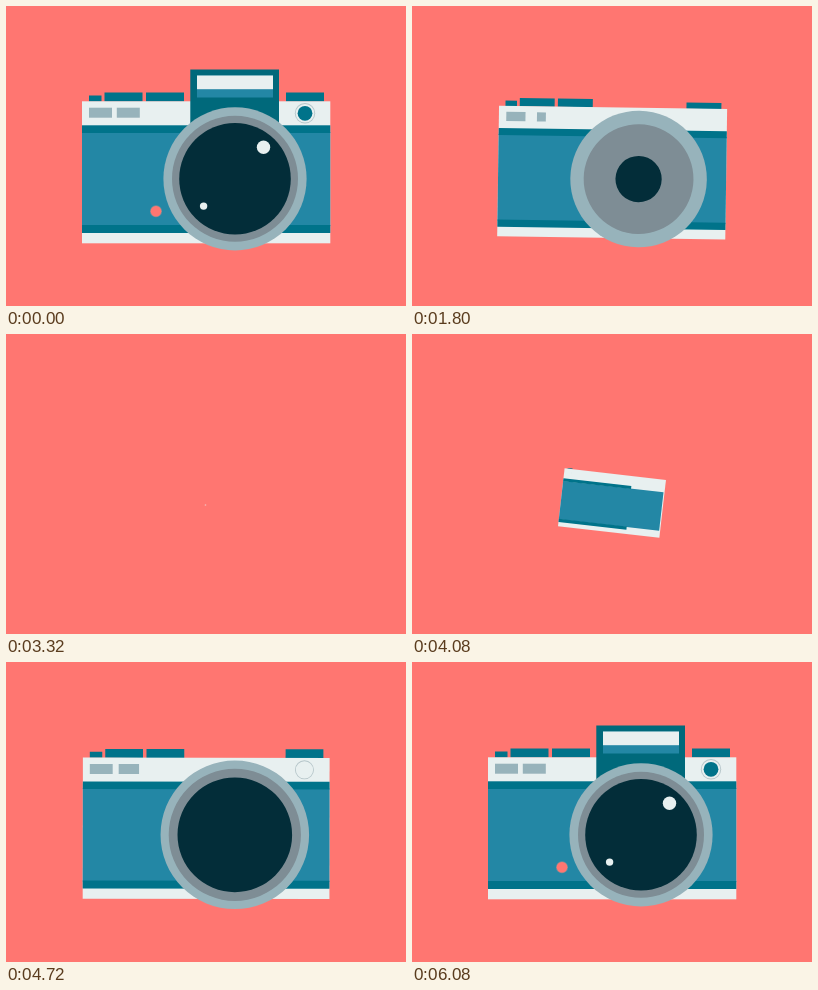
Recreate the animation shown at these times as an HTML page with a canvas. Size 400x300 px, loop 6.28 s.

```html
<!DOCTYPE html>
<html lang="en">
<head>
<meta charset="utf-8">
<title>Camera</title>
<style>
html, body { margin: 0; width: 100%; height: 100%; overflow: hidden; background: #ff7671; }
canvas { display: block; width: 400px; height: 300px; }
</style>
</head>
<body>
<canvas id="stage"></canvas>
<script>
const LOOP = 6280, STEP = 40, MIRROR = 6335;
const BG = '#ff7671', WHITE = '#e8f0f0', BLUE = '#2387a5', TEAL = '#00738a',
      DEEP = '#00697b', STEEL = '#97b3bb', GRAY = '#7e8d95', INK = '#032d39';
const ORIGIN = { x: 199.5, y: 171 };

const canvas = document.getElementById('stage');
const ctx = canvas.getContext('2d');
const ratio = window.devicePixelRatio || 1;
canvas.width = 400 * ratio;
canvas.height = 300 * ratio;

const clamp = u => Math.min(1, Math.max(0, u));
const quadOut = u => 1 - (1 - u) ** 2;
const quadInOut = u => u < 0.5 ? 2 * u * u : 1 - 2 * (1 - u) ** 2;
const backOut = u => 1 + 2.70158 * (u - 1) ** 3 + 1.70158 * (u - 1) ** 2;

// Progress of a part that starts at a given time and lasts for dur.
const grow = (time, start, dur, ease) => ease(clamp((time - start) / dur));

// Smooth curve through [time, value] points that never overshoots them.
function curve(points) {
  const last = points.length - 1;
  const slope = i => (points[i + 1][1] - points[i][1]) / (points[i + 1][0] - points[i][0]);
  const tangent = points.map((_, i) => {
    if (i === 0) return slope(0);
    if (i === last) return 0;
    const a = slope(i - 1), b = slope(i);
    return a * b > 0 ? 2 * a * b / (a + b) : 0;
  });
  return time => {
    if (time <= points[0][0]) return points[0][1];
    if (time >= points[last][0]) return points[last][1];
    let i = 0;
    while (time > points[i + 1][0]) i++;
    const [t0, v0] = points[i], [t1, v1] = points[i + 1];
    const span = t1 - t0, u = (time - t0) / span, w = 1 - u;
    return v0 * (1 + 2 * u) * w * w + tangent[i] * span * u * w * w
         + v1 * u * u * (3 - 2 * u) - tangent[i + 1] * span * u * u * w;
  };
}

const zoom = curve([[3310, 0.005], [3500, 0.018], [3775, 0.133], [3920, 0.244],
  [4255, 0.618], [4440, 0.851], [4560, 0.933], [4660, 0.98], [4780, 1]]);
const tilt = curve([[3310, 360], [3500, 140], [3775, 33], [3920, 13.8],
  [4255, 2.4], [4440, 1.4], [4560, 0.7], [4780, 0]]);
const lensPop = curve([[-150, 0], [-100, 0.04], [-15, 0.14], [0, 0.2], [85, 0.47],
  [185, 0.958], [270, 1.035], [400, 1.058], [440, 1.053], [560, 1]]);

// x, width, height, start time
const buttons = [[83, 12.5, 6, 4030], [98.5, 38, 9, 4080], [140, 38, 9, 4140], [280, 38, 9, 4410]];

function rect(color, x, y, w, h) {
  if (w <= 0 || h <= 0) return;
  ctx.fillStyle = color;
  ctx.fillRect(x, y, w, h);
}

function disc(color, x, y, r) {
  if (r <= 0) return;
  ctx.fillStyle = color;
  ctx.beginPath();
  ctx.arc(x, y, r, 0, Math.PI * 2);
  ctx.fill();
}

function drawBody(time) {
  for (const [x, w, h, start] of buttons) {
    const rise = h * grow(time, start, 250, quadOut);
    rect(TEAL, x, 95.5 - rise, w, rise);
  }
  rect(WHITE, 76, 95.3, 248.3, 142);
  rect(BLUE, 76, 126, 248.3 * grow(time, 3560, 560, quadInOut), 94);
  const band = 248.3 * grow(time, 3700, 640, quadInOut);
  rect(TEAL, 76, 119.3, band, 7.7);
  rect(TEAL, 76, 219, band, 8);

  [[94.5, 4066], [122.3, 4261]].forEach(([mid, start]) => {
    const w = 23 * grow(time, start, 597, quadInOut);
    rect(STEEL, mid - w / 2, 101.7, w, 10);
  });
}

function drawFlash(time) {
  const h = 56 * grow(time, 4778, 380, quadOut);
  rect(DEEP, 184.3, 119.5 - h, 88.7, h);
  rect(BLUE, 191, 69.5, 76, 22 * grow(time, 5210, 400, quadInOut));
  rect(WHITE, 191, 69.5, 76, 13.7 * grow(time, 5060, 380, quadInOut));
}

function drawKnobs(time) {
  const rim = grow(time, 4560, 500, backOut);
  disc('#b5c5c9', 299, 107.3, 10.2 * rim);
  disc(WHITE, 299, 107.3, 9.3 * rim);
  disc(TEAL, 299, 107.3, 7.4 * grow(time, 4770, 600, backOut));
  disc(GRAY, 150, 205.2, 6 * grow(time, 4885, 500, backOut));
  disc(BG, 150, 205.2, 5.3 * grow(time, 5050, 500, backOut));
}

function drawLens(time) {
  const rings = [[STEEL, 71.6], [GRAY, 63], [INK, 55.8]];
  rings.forEach(([color, r], i) => disc(color, 229, 172.8, r * lensPop(time - 4255 - i * 100)));
  disc(WHITE, 257.5, 141.2, 6.7 * grow(time, 5420, 660, backOut));
  disc(WHITE, 197.6, 200.1, 3.7 * grow(time, 5520, 560, backOut));
}

function draw(clock) {
  // The first half of the loop runs the build backwards.
  const time = clock < MIRROR / 2 ? MIRROR - clock : clock;
  ctx.setTransform(ratio, 0, 0, ratio, 0, 0);
  rect(BG, 0, 0, 400, 300);
  if (time < 3310) return;
  const s = zoom(time);
  ctx.translate(ORIGIN.x, ORIGIN.y);
  ctx.rotate(tilt(time) * Math.PI / 180);
  ctx.scale(s, s);
  ctx.translate(-ORIGIN.x, -ORIGIN.y);
  drawBody(time);
  drawFlash(time);
  drawKnobs(time);
  drawLens(time);
}

const begin = performance.now();
function tick() {
  const clock = (performance.now() - begin) % LOOP;
  draw(Math.floor(clock / STEP) * STEP);
  requestAnimationFrame(tick);
}
tick();
</script>
</body>
</html>
```
